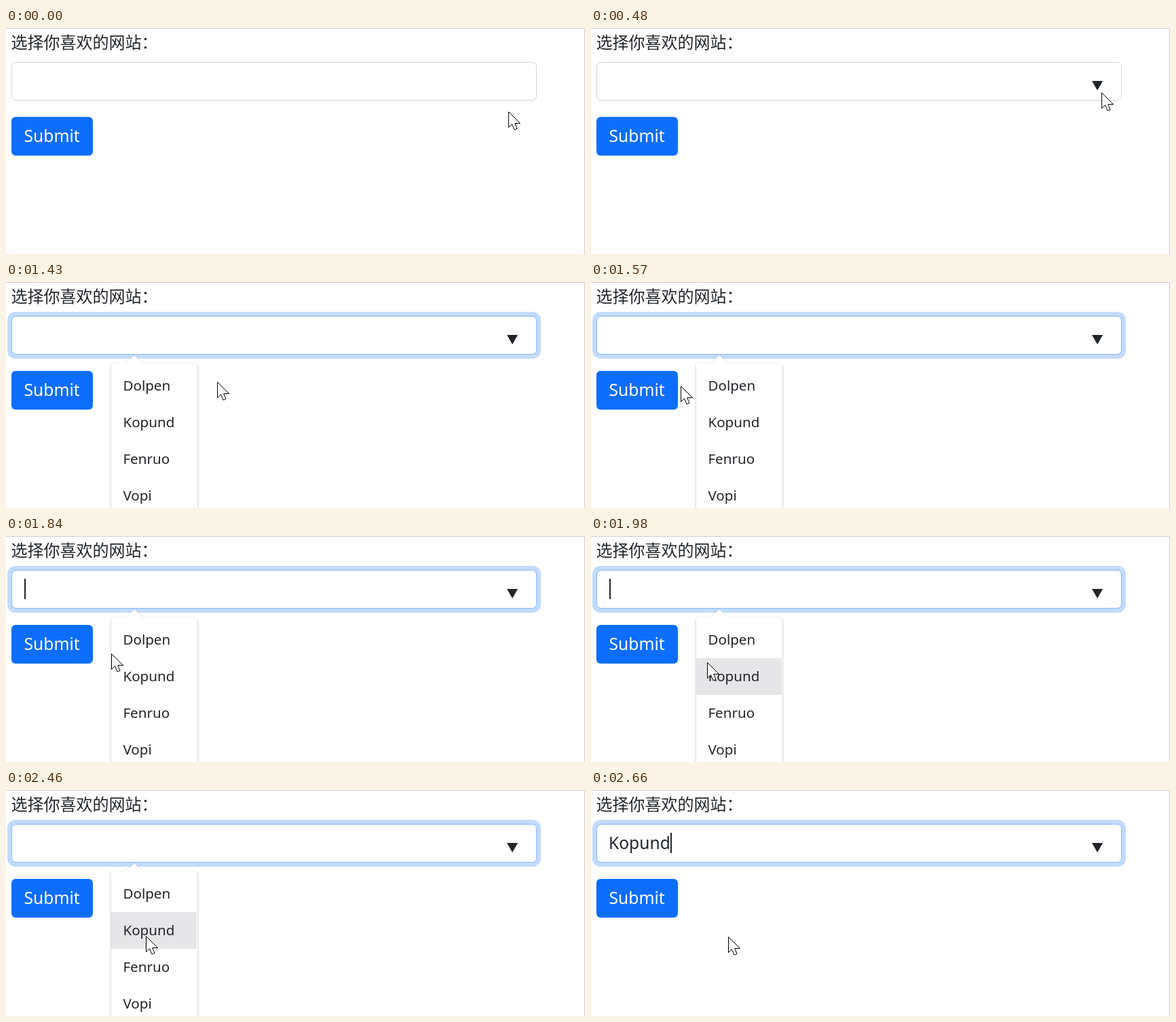
An HTML page that plays this animation: 853x333 px, repeating every 2930 ms.

```html
<!DOCTYPE html>
<html lang="zh-CN">
<head>
<meta charset="utf-8">
<title>Datalist</title>
<style>
  html, body { margin: 0; width: 100%; height: 100%; overflow: hidden; background: #fff; }
  svg { display: block; width: 853px; height: 333px; font-family: "Noto Sans", "Open Sans", sans-serif; fill: #212529; }
  .label { font: 24px "Noto Sans CJK SC", "Noto Sans CJK", "Noto Sans", sans-serif; }
  .field { font-size: 24.6px; }
  .option { font-size: 20.6px; }
  .bubble { fill: #fff; filter: drop-shadow(0 1px 1.5px rgba(0, 0, 0, .32)); }
</style>
</head>
<body>
<svg viewBox="0 0 853 333" xmlns="http://www.w3.org/2000/svg">
  <path d="M0 .5H852.5V333" fill="none" stroke="#ccc"/>
  <text class="label" x="7.4" y="29.5">选择你喜欢的网站：</text>

  <rect id="ring" x="2" y="44" width="786" height="69" rx="12" fill="#c2dbfe"/>
  <rect x="8.5" y="50.5" width="773" height="56" rx="6" fill="#fff" stroke="#ced4da"/>
  <rect id="edge" x="8.5" y="50.5" width="773" height="56" rx="6" fill="none" stroke="#86b7fe"/>
  <text id="value" class="field" x="26" y="87">Kopund</text>
  <rect id="caret" x="27" y="63" width="2" height="30"/>
  <path id="arrow" d="M738 78H754L746 92Z"/>

  <rect x="8" y="131" width="120" height="57" rx="6" fill="#0d6efd"/>
  <text class="field" x="26.6" y="168" fill="#fff">Submit</text>

  <g id="popup">
    <path class="bubble" d="M155 345V124Q155 120 159 120H176L189 108L202 120H278Q282 120 282 124V345Z"/>
    <rect id="hover" x="155" y="180" width="126" height="54" fill="#e6e6e8"/>
    <g id="options" class="option"></g>
  </g>

  <path id="pointer" d="M.5 .5V23.5L5.5 18.7L9 27L13 25.3L9.7 17.5H17.5Z" fill="#fff" stroke="#000"/>
</svg>
<script>
const LOOP = 2930, TICK = 68.4, BLINK = 8;
const FOCUS = 9, HOVER = 28, PICK = 37;   // in ticks

const $ = id => document.getElementById(id);
const clamp = v => Math.max(0, Math.min(1, v));
const show = (id, amount) => $(id).setAttribute('opacity', +amount);

// the pointer rests between these curved moves
const start = [740, 123];
const moves = [
  { from: 0, to: 7, bend: [726, 105], end: [752, 95] },
  { from: 18, to: 23, bend: [298, 160], end: [132, 153] },
  { from: 24, to: 33, bend: [165, 182], end: [206, 215] },
  { from: 36, to: 39, bend: [204, 216], end: [202, 216] }
];

['Dolpen', 'Kopund', 'Fenruo', 'Vopi'].forEach((name, i) => {
  const row = document.createElementNS('http://www.w3.org/2000/svg', 'text');
  row.setAttribute('x', 172.4);
  row.setAttribute('y', 159.5 + 54 * i);
  row.textContent = name;
  $('options').append(row);
});

const curve = (a, b, c, u) => (1 - u) ** 2 * a + 2 * u * (1 - u) * b + u * u * c;

function tipAt(tick) {
  return moves.reduce((tip, { from, to, bend, end }) => {
    const u = clamp((tick - from) / (to - from));
    return tip.map((v, i) => curve(v, bend[i], end[i], u));
  }, start).map(Math.round);
}

function draw(now) {
  const tick = Math.floor((now % LOOP + 8) / TICK);
  const [x, y] = tipAt(tick);
  const chosen = tick >= PICK;
  const focused = tick >= FOCUS;
  const sinceFocus = tick - FOCUS + 1;
  const lit = focused && Math.floor((tick - FOCUS) / BLINK) % 2 === 0;

  $('pointer').setAttribute('transform', `translate(${x} ${y})`);
  show('arrow', focused || y < 107);
  show('ring', clamp(sinceFocus / 2));
  show('edge', clamp(sinceFocus / 2));
  show('popup', clamp(sinceFocus / 3) * clamp((PICK + 2 - tick) / 3));
  show('hover', tick >= HOVER);
  show('value', chosen);

  const end = 26 + $('value').getComputedTextLength();
  $('caret').setAttribute('x', chosen ? Math.round(end) : 27);
  show('caret', chosen || lit);
}

function loop() {
  draw(performance.now());
  requestAnimationFrame(loop);
}
loop();
</script>
</body>
</html>
```
